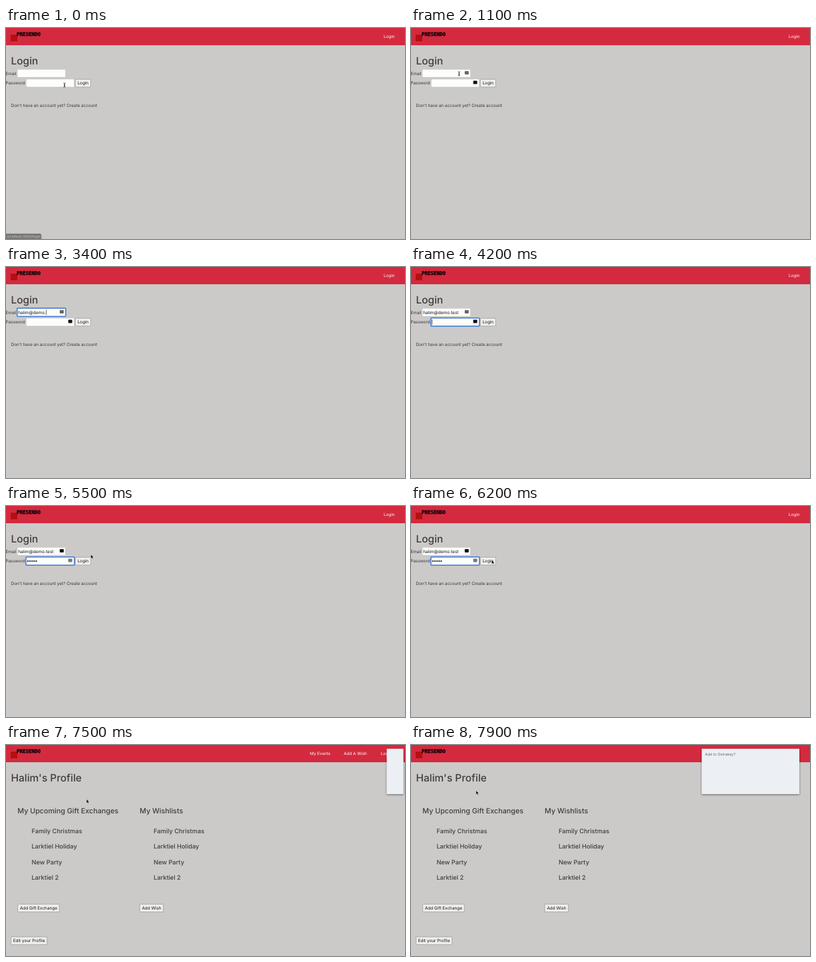
An HTML page that plays this animation: 600x318 px, repeating every 8000 ms.

```html
<!DOCTYPE html>
<html lang="en">
<head>
<meta charset="utf-8">
<title>Gift exchange login</title>
<style>
  html, body { margin: 0; width: 100%; height: 100%; overflow: hidden; background: #cbcac8; }
  svg { display: block; width: 100%; height: 100%; }
  text { font-family: Inter, Roboto, sans-serif; text-rendering: geometricPrecision; white-space: pre; }
</style>
</head>
<body>
<svg id="stage" viewBox="0 0 600 318"></svg>
<script>
const LOOP = 8000, STEP = 100;
const EMAIL = 'halim@demo.test';
const INK = '#3a3433';

const text = (x, y, str, size = 6.3, fill = INK, extra = '') =>
  `<text x="${x}" y="${y}" font-size="${size}" fill="${fill}" ${extra}>${str}</text>`;
const rect = (x, y, w, h, fill, extra = '') =>
  `<rect x="${x}" y="${y}" width="${w}" height="${h}" fill="${fill}" ${extra}/>`;
const title = (x, y, str, size) => text(x, y, str, size, '#433b3a', 'font-weight="500"');
const group = (id, body, extra = '') => `<g id="${id}" ${extra}>${body}</g>`;

const field = (x, y) =>
  rect(x, y, 72.4, 12, '#fdfdfc', 'stroke="#b9b8b6" stroke-width=".5"');
const ring = (id, x, y) =>
  rect(x - .3, y - .3, 73, 12.6, 'none', `id="${id}" rx="1" stroke="#3f7bd6" stroke-width="1.5"`);
const button = (x, y, w, label, labelFill = '#111', stroke = '#8a8987') =>
  rect(x, y, w, 11.6, '#efefee', `rx=".5" stroke="${stroke}" stroke-width=".6"`) +
  text(x + w / 2, y + 8, label, 6.4, labelFill, 'text-anchor="middle"');
const icon = (id, x, y) => rect(x, y, 6, 5, '#666', `id="${id}" rx=".8"`);
const events = x => ['Family Christmas', 'Larktiel Holiday', 'New Party', 'Larktiel 2']
  .map((name, i) => title(x, 133 + i * 23.4, name, 9.25)).join('');
const nav = (x, str) => text(x, 14.8, str, 6.3, '#fff');
const dots = Array.from({ length: 5 }, (_, i) =>
  `<circle class="dot" cx="${33 + i * 3.1}" cy="83.1" r="1.15" fill="#111"/>`).join('');

const stage = document.getElementById('stage');
stage.innerHTML =
  `<defs><filter id="shadow" x="-30%" y="-30%" width="160%" height="160%">
    <feDropShadow dx="0" dy="1" stdDeviation="1.4" flood-opacity=".5"/></filter></defs>` +
  rect(0, 0, 600, 318, '#cbcac8') +
  rect(0, 0, 600, 26, '#d32a3f') +
  rect(7, 10, 10, 10, '#b50f12') +
  text(16, 12, 'PRESENDO', 7.5, '#0b0506',
    'style="font-family:\'DejaVu Sans Mono\',monospace" font-weight="700" stroke="#0b0506" stroke-width=".35"') +
  group('login',
    nav(568, 'Login') +
    title(7.6, 55, 'Login', 15.4) +
    text(-.5, 70.6, 'Email') + text(-.5, 85.4, 'Password') +
    field(17, 62.2) + field(30.2, 77) +
    ring('emailRing', 17, 62.2) + ring('passRing', 30.2, 77) +
    group('icons', icon('emailIcon', 80.8, 65) + icon('passIcon', 93.6, 79.6)) +
    text(18.2, 70.6, '', 6.5, '#111', 'id="email"') + dots +
    rect(0, 0, .6, 8, '#111', 'id="caret"') +
    group('ready', button(104.3, 77.3, 23, 'Login')) +
    group('sent', button(104.3, 77.3, 23, 'Login', '#a3a2a1', '#b9b8b6') +
      rect(104, 77, 23.6, 12.2, '#cbcac8', 'opacity=".5"')) +
    text(7.6, 118.8, "Don't have an account yet? Create account", 6.36)) +
  group('profile',
    nav(457, 'My Events') + nav(508, 'Add A Wish') + nav(563.6, 'Logout') +
    title(7.6, 55, "Halim's Profile", 15.4) +
    title(17.3, 103, 'My Upcoming Gift Exchanges', 10.75) +
    title(201, 103, 'My Wishlists', 10.75) +
    events(38.4) + events(222) +
    button(17.7, 240, 62.4, 'Add Gift Exchange') +
    button(201.2, 240, 35.4, 'Add Wish') +
    button(7.7, 289.2, 54, 'Edit your Profile')) +
  group('hint', rect(-3, 310, 56, 11, '#2a292b', 'rx="2" filter="url(#shadow)"') +
    text(1.4, 316, 'localhost:3000/login', 5.2, '#c4c3c4')) +
  group('waiting', rect(-3, 310, 202.5, 11, '#2a292b', 'rx="2" filter="url(#shadow)"') +
    text(1.4, 316, 'Waiting for localhost...', 5, '#a5a4a6')) +
  group('popup',
    rect(0, 5.7, 10, 68.3, '#eceff3', 'id="panel" filter="url(#shadow)"') +
    text(442, 16, 'Add to Ostrakey?', 5.65, '#6b6d70', 'id="ask"')) +
  `<path id="beam" d="M-1.6-3.2Q0-3.2 0-2V2Q0 3.2-1.6 3.2M1.6-3.2Q0-3.2 0-2V2Q0 3.2 1.6 3.2M-.8.9H.8"
    fill="none" stroke="#222" stroke-width=".7"/>
  <path id="arrow" d="M0 0V6.2L1.4 4.9L2.4 7.1L3.5 6.6L2.5 4.5H4.4Z"
    fill="#000" stroke="#fff" stroke-width=".5" stroke-linejoin="round"/>`;

const el = {};
stage.querySelectorAll('[id]').forEach(node => el[node.id] = node);
const dotEls = stage.querySelectorAll('.dot');

const clamp = v => Math.min(1, Math.max(0, v));
const ramp = (t, from, to) => clamp((t - from) / (to - from));
const smooth = p => p * p * (3 - 2 * p);
const mix = (a, b, p) => a + (b - a) * p;
const show = (node, on) => node.setAttribute('visibility', on ? 'visible' : 'hidden');
const fade = (node, v) => node.setAttribute('opacity', v);
const place = (node, x, y) => node.setAttribute('transform', `translate(${x} ${y})`);

// Key press times: name, then the rest of the address at an even pace.
const nameKeys = [1900, 2100, 2200, 2400, 2700];
const emailKeys = [...nameKeys, ...Array.from({ length: 10 }, (_, i) => 2900 + i * 800 / 9)];
const passKeys = [4500, 4700, 4900, 5000, 5200];
const typed = (keys, t) => keys.filter(k => k <= t).length;

const CLICK = 1300, TAB = 3900, SUBMIT = 6400, LOADED = 7200;

function drawForm(t) {
  const inEmail = t >= CLICK && t < TAB, inPass = t >= TAB && t < SUBMIT;
  const count = typed(passKeys, t);
  el.email.textContent = EMAIL.slice(0, typed(emailKeys, t));
  dotEls.forEach((dot, i) => show(dot, i < count));
  show(el.emailRing, inEmail);
  show(el.passRing, inPass);
  show(el.icons, t >= 900);
  el.passIcon.setAttribute('fill', t < 4500 ? '#111' : '#777');
  el.emailIcon.setAttribute('fill', t >= 4500 && t < SUBMIT ? '#111' : '#666');
  show(el.caret, inEmail || inPass && t < 5500);
  const end = el.email.textContent ? el.email.getComputedTextLength() : 0;
  place(el.caret, inEmail ? 18.4 + end : 31.6 + count * 3.1, inEmail ? 64.3 : 79);
  show(el.ready, t < SUBMIT);
  show(el.sent, t >= SUBMIT);
}

function drawPointer(t) {
  const toField = smooth(ramp(t, 100, 1200));
  place(el.beam, mix(88, 72, toField), mix(86, 68.5, toField));
  show(el.beam, t < 1900);
  const toButton = smooth(ramp(t, 5500, 6300)), away = smooth(ramp(t, 7500, 7900));
  place(el.arrow, mix(mix(127.6, 121, toButton), 97.8, away), mix(mix(73, 81.6, toButton), 68.6, away));
  show(el.arrow, t >= 5500);
}

function drawPopup(t) {
  const p = 1 - (1 - ramp(t, 7500, 7900)) ** 1.6;
  const left = mix(572.6, 437.2, p), right = mix(597.6, 584, p);
  el.panel.setAttribute('x', left);
  el.panel.setAttribute('width', right - left);
  fade(el.popup, t >= 7500 ? 1 : 0);
  fade(el.ask, t >= 7800 ? 1 : 0);
}

function draw(time) {
  const t = Math.floor(time % LOOP / STEP) * STEP;
  const onLogin = t < LOADED;
  el.login.style.display = onLogin ? '' : 'none';
  el.profile.style.display = onLogin ? 'none' : '';
  if (onLogin) drawForm(t);
  drawPointer(t);
  drawPopup(t);
  fade(el.hint, .52 * (1 - ramp(t, 0, 500)));
  fade(el.waiting, t < 7300 ? ramp(t, 6400, 6700) : 0);
}

let start;
function tick(now) {
  start ??= now;
  draw(now - start);
  requestAnimationFrame(tick);
}
draw(0);
requestAnimationFrame(tick);
</script>
</body>
</html>
```
